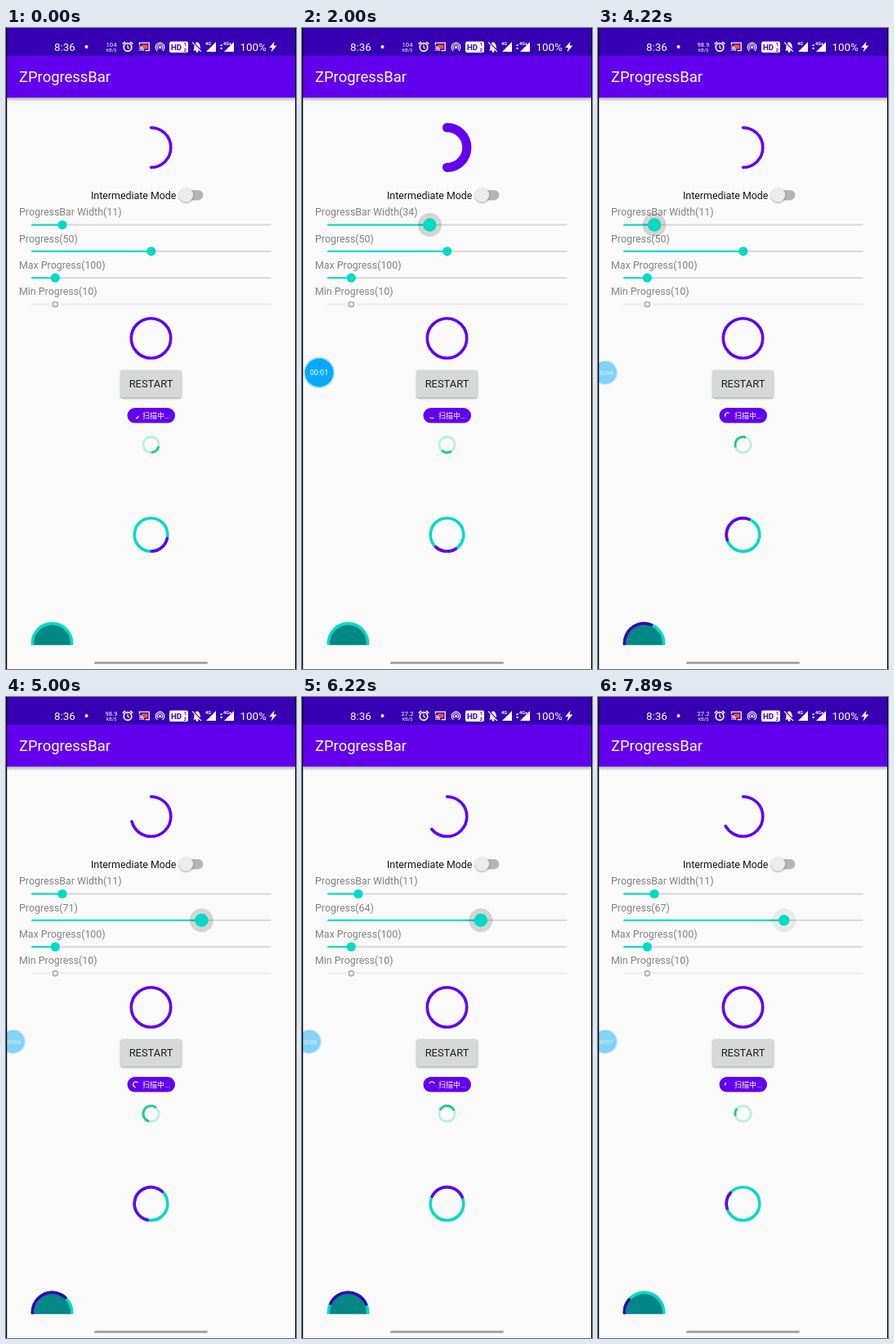
An HTML page with a canvas that plays this animation: 355x783 px, repeating every 8000 ms.

```html
<!DOCTYPE html>
<html lang="en">
<head>
<meta charset="utf-8">
<title>ZProgressBar</title>
<style>
  html, body { margin: 0; width: 100%; height: 100%; overflow: hidden; background: #fafafa; }
  canvas { display: block; width: 355px; height: 783px; }
</style>
</head>
<body>
<canvas></canvas>
<script>
const W = 355, H = 783, LOOP = 8000, FPS = 9;
const PURPLE = '#6200ee', DARK = '#3700b3', TEAL = '#03dac5', WHITE = '#fff';
const canvas = document.querySelector('canvas');
const c = canvas.getContext('2d');
const dpr = window.devicePixelRatio || 1;
canvas.width = W * dpr;
canvas.height = H * dpr;

const rad = deg => deg * Math.PI / 180;
const clamp = x => Math.max(0, Math.min(1, x));
const smooth = x => { x = clamp(x); return x * x * (3 - 2 * x); };

// Eased value through [time, value] pairs
function track(keys, t) {
  let [t0, v0] = keys[0];
  for (const [t1, v1] of keys) {
    if (t < t1) return v0 + (v1 - v0) * smooth((t - t0) / (t1 - t0));
    [t0, v0] = [t1, v1];
  }
  return v0;
}

function rect(x, y, w, h, color, r = 0) {
  c.fillStyle = color;
  c.beginPath();
  c.roundRect(x, y, w, h, r);
  c.fill();
}

function disc(x, y, r, color) {
  c.fillStyle = color;
  c.beginPath();
  c.arc(x, y, r, 0, 7);
  c.fill();
}

function arc(x, y, r, w, color, from = 0, sweep = 360, cap = 'round') {
  c.strokeStyle = color;
  c.lineWidth = w;
  c.lineCap = cap;
  c.beginPath();
  c.arc(x, y, r, rad(from), rad(from + sweep));
  c.stroke();
}

function poly(points, color) {
  c.fillStyle = color;
  c.beginPath();
  for (let i = 0; i < points.length; i += 2) c.lineTo(points[i], points[i + 1]);
  c.fill();
}

function line(points, color, w) {
  c.strokeStyle = color;
  c.lineWidth = w;
  c.lineCap = 'butt';
  c.beginPath();
  for (let i = 0; i < points.length; i += 2) c.lineTo(points[i], points[i + 1]);
  c.stroke();
}

function text(s, x, y, size, color, align = 'left', weight = 400) {
  c.font = `${weight} ${size}px Roboto, "Noto Sans CJK SC", "Noto Sans CJK", sans-serif`;
  c.fillStyle = color;
  c.textAlign = align;
  c.fillText(s, x, y);
}

function shadow(blur, dy, color) {
  c.shadowBlur = blur * dpr;
  c.shadowOffsetY = dy * dpr;
  c.shadowColor = color;
}
const noShadow = () => shadow(0, 0, 'transparent');

function statusBar(t) {
  rect(0, 0, W, 34, DARK);
  text('8:36', 59, 27.5, 13.4, WHITE);
  disc(98.5, 23, 2, WHITE);
  text(t < 2700 ? '104' : t < 5700 ? '98.9' : '27.2', 129, 22.5, 7.6, WHITE, 'center');
  text('KB/S', 129, 29, 5.6, WHITE, 'center');

  // Alarm clock
  arc(149, 23.5, 4.8, 1.7, WHITE);
  line([149, 20.5, 149, 24, 151.2, 25], WHITE, 1.2);
  line([142.8, 19.6, 146, 16.8], WHITE, 1.6);
  line([152, 16.8, 155.2, 19.6], WHITE, 1.6);

  // Screen cast
  line([163.4, 21, 163.4, 18.2, 175.2, 18.2, 175.2, 27.6, 170.5, 27.6], WHITE, 1.3);
  rect(166, 20.3, 7.4, 5.2, '#e8503a');
  for (const r of [1.2, 3.4, 5.4]) arc(163.2, 28, r, 1.1, WHITE, -90, 90, 'butt');

  // Hotspot
  disc(188.5, 23.5, 1.6, WHITE);
  arc(188.5, 23.5, 3.2, 1.1, WHITE, 140, 260);
  arc(188.5, 23.5, 5.4, 1.1, WHITE, 130, 280);

  rect(200, 16.5, 23, 13.5, WHITE, 2);
  text('HD', 202, 27, 9.6, DARK, 'left', 700);
  text('1', 219.3, 22.4, 6, DARK, 'center', 700);
  text('2', 219.3, 28.8, 6, DARK, 'center', 700);

  // Muted bell
  poly([230, 26.5, 230.6, 20.5, 232.4, 18.3, 234, 17, 235.6, 18.3, 237.4, 20.5, 238, 26.5, 239, 27.5, 229, 27.5], WHITE);
  disc(234, 28.6, 1.4, WHITE);
  line([228.5, 17.2, 239.8, 29], DARK, 2.2);
  line([228, 17.4, 239, 29.2], WHITE, 1.1);

  // Mobile signal
  poly([245, 29, 257, 29, 257, 17], WHITE);
  text('4G', 244, 20.6, 5.6, WHITE, 'left', 700);
  poly([262, 22, 263.6, 19.6, 265.2, 22], WHITE);
  poly([262, 24, 263.6, 26.4, 265.2, 24], WHITE);
  poly([267, 29, 279, 29, 279, 17], WHITE);
  text('4G+', 266, 20.6, 5.6, WHITE, 'left', 700);

  text('100%', 286.5, 27.5, 13.4, WHITE);
  poly([328.6, 16.5, 322.2, 24, 326, 24, 324.6, 29.5, 331.4, 21.6, 327.6, 21.6], WHITE);
}

function slider(y, x, press = 0) {
  rect(31, y - 1, 293.5, 2, '#d7d7d7', 1);
  rect(31, y - 1, x - 31, 2, TEAL, 1);
  if (press) disc(x, y, 14.5, `rgba(0,0,0,${0.15 * press})`);
  disc(x, y, 5.6 + 2.6 * press, TEAL);
}

function badge(t) {
  const show = smooth((t - 600) / 250);
  if (!show) return;
  const dock = smooth((t - 3600) / 330);
  const seconds = Math.max(0, Math.floor((t - 150) / 1000));
  c.save();
  c.globalAlpha = show * (1 - 0.58 * dock);
  c.translate(21 - 12 * dock, 421);
  c.scale(1 - 0.2 * dock, 1 - 0.2 * dock);
  disc(0, 0, 19.2, '#b5e2f8');
  disc(0, 0, 17.4, '#06a9fc');
  c.globalAlpha = show * (1 - 0.2 * dock);
  text('00:0' + seconds, 0, 3.2, 9, WHITE, 'center');
  c.restore();
}

function draw(t) {
  c.setTransform(dpr, 0, 0, dpr, 0, 0);
  rect(0, 0, W, H, '#fafafa');

  shadow(4, 1.5, 'rgba(0,0,0,.35)');
  rect(0, 34, W, 51, PURPLE);
  noShadow();
  statusBar(t);
  text('ZProgressBar', 16, 66, 18.4, WHITE);

  const width = track([[0, 11], [900, 11], [2000, 34], [3000, 9], [4220, 11]], t);
  const progress = track([[0, 50], [4500, 50], [5000, 71], [6220, 64], [7890, 67]], t);
  const pressAt = (down, up) => clamp((t - down) / 150) * (1 - clamp((t - up) / 200));

  arc(177.5, 146, 24.3, width * 0.329, PURPLE, -90, progress * 3.6);

  text('Intermediate Mode', 104, 209, 12.4, '#161616');
  rect(217, 198, 24.3, 12.4, '#b4b4b4', 6.2);
  shadow(2.5, 1, 'rgba(0,0,0,.35)');
  disc(220.5, 204, 8.6, '#ececec');
  noShadow();

  const label = (s, y) => text(s, 16, y, 12.4, '#828282');
  label(`ProgressBar Width(${Math.round(width)})`, 229);
  label(`Progress(${Math.round(progress)})`, 261.5);
  label('Max Progress(100)', 293.7);
  label('Min Progress(10)', 326);
  slider(240.5, 31 + 3.8 * (width - 1), pressAt(850, 4330));
  slider(272.8, 31 + 2.935 * progress, pressAt(4500, 7780));
  slider(305.2, 60.3);
  rect(31, 336.6, 23.5, 2, '#ebebeb');
  rect(66, 336.6, 258.5, 2, '#ebebeb');
  arc(60.3, 337.6, 3.1, 1.7, '#aaa');

  arc(177.5, 379, 24.2, 3.6, PURPLE);

  shadow(2.5, 1, 'rgba(0,0,0,.4)');
  rect(140.5, 418, 74, 33.5, '#d6d7d7', 2);
  noShadow();
  text('RESTART', 177.5, 439, 12.9, '#202020', 'center');

  // All spinners share one rotation and one breathing sweep
  const phase = t / 2000 * 2 * Math.PI;
  const cos = Math.cos(phase), sin = Math.sin(phase);
  const from = 1.5 + 0.3825 * t + 11.5 * cos - 38 * sin;
  const sweep = 142.5 - 67.5 * cos + 62 * sin;

  rect(148.5, 464, 58.5, 18.6, PURPLE, 9.3);
  arc(159, 473.3, 3.4, 1.1, WHITE, from, sweep);
  text('扫描中...', 167, 476.8, 9, WHITE);

  arc(177.5, 509, 9.6, 3, '#c0eedf');
  arc(177.5, 509, 9.6, 3, '#26c98f', from, sweep, 'butt');

  arc(177.5, 619, 20.3, 3.6, TEAL);
  arc(177.5, 619, 20.3, 3.6, PURPLE, from, sweep);

  c.save();
  c.beginPath();
  c.rect(0, 700, W, 53.8);
  c.clip();
  disc(56.5, 751.5, 23, '#018786');
  arc(56.5, 751.5, 24.1, 3.6, TEAL);
  arc(56.5, 751.5, 24.1, 3.6, DARK, from, sweep);
  c.restore();

  badge(t);
  rect(108, 774, 139, 3, '#a8a8a8', 1.5);
  rect(0, 0, 1.2, H, '#000');
  rect(W - 1, 0, 1, H, '#000');
}

const start = performance.now();
function frame() {
  const t = (performance.now() - start) % LOOP;
  draw(Math.floor(t * FPS / 1000 + 0.05) * 1000 / FPS);
  requestAnimationFrame(frame);
}
frame();
</script>
</body>
</html>
```
